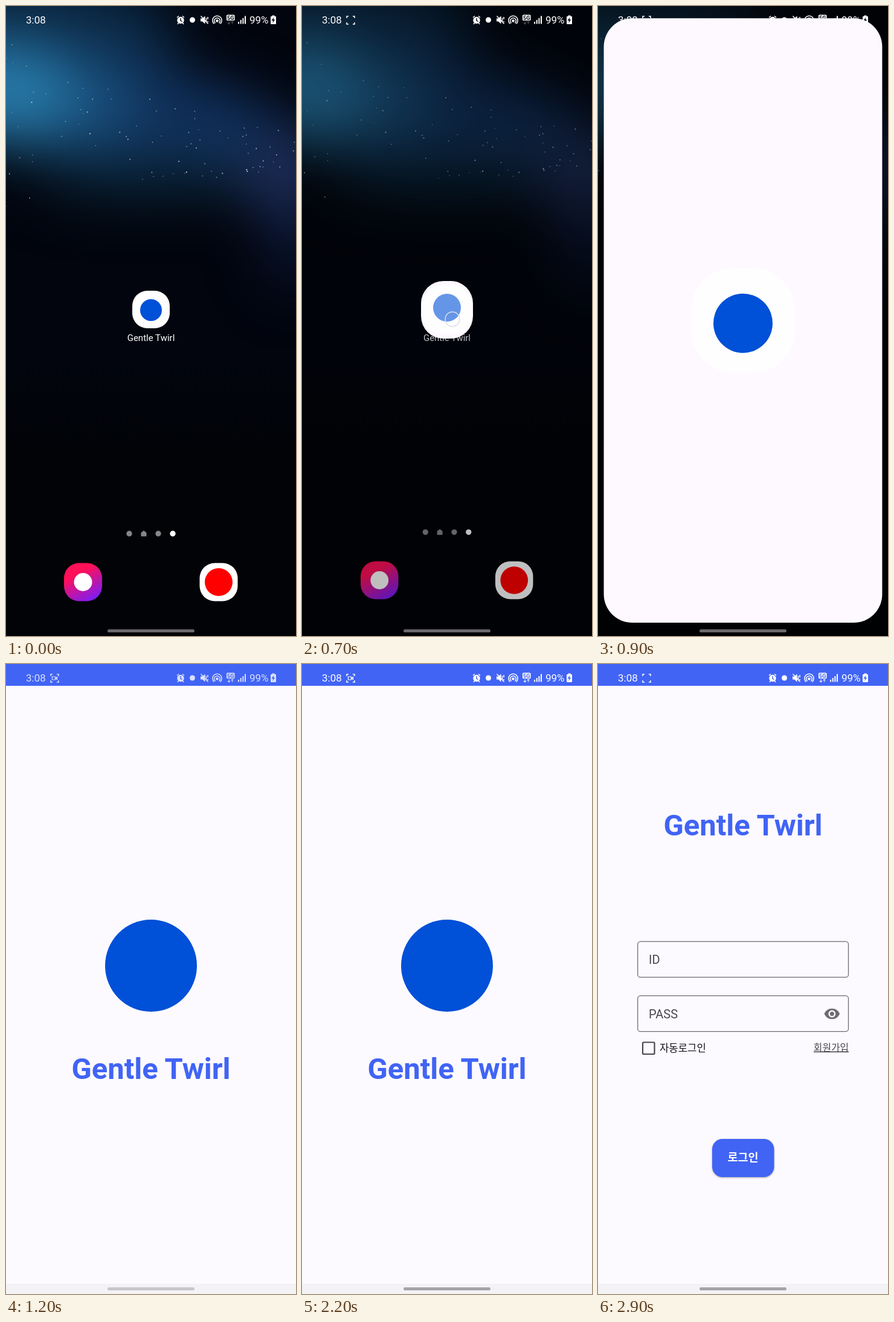
An HTML page for the animation above (3200 ms loop, 480x1040 px).

```html
<!DOCTYPE html>
<html lang="ko">
<head>
<meta charset="utf-8">
<title>App launch</title>
<style>
  html, body { margin: 0; width: 100%; height: 100%; overflow: hidden; background: #02040a; }
  svg { display: block; width: 100%; height: 100%; --bg: #02060e; }
  text { font-family: Roboto, "Noto Sans CJK KR", "Noto Sans CJK", sans-serif; }
  .title { font-size: 49px; font-weight: 700; fill: #4164f5; text-anchor: middle; }
  .hint { font-size: 20px; fill: #49454f; }
  .box { fill: none; stroke: #6f6b73; stroke-width: 1.3; }
  .line { fill: none; stroke: #fff; stroke-width: 1.5; }
  .cut { fill: none; stroke: var(--bg); stroke-width: 1.4; }
  .glow { filter: blur(45px); }
  #page { --bg: #4164f5; }
</style>
</head>
<body>
<svg viewBox="0 0 480 1040">
  <defs>
    <linearGradient id="tile" x1=".25" y1="0" x2=".8" y2="1">
      <stop offset=".25" stop-color="#ff1058"/>
      <stop offset="1" stop-color="#761dff"/>
    </linearGradient>
    <linearGradient id="night" x2="0" y2="1">
      <stop offset=".56" stop-color="#02050e"/>
      <stop offset=".7" stop-color="#010307"/>
    </linearGradient>
  </defs>

  <rect width="480" height="1040" fill="url(#night)"/>
  <g id="wall">
    <g class="glow">
      <ellipse cx="60" cy="50" rx="220" ry="100" fill="#0c2b48"/>
      <ellipse cx="210" cy="180" rx="310" ry="95" fill="#10305a" transform="rotate(14 210 180)"/>
      <ellipse cx="230" cy="290" rx="190" ry="30" fill="#08202e"/>
      <ellipse cx="475" cy="370" rx="50" ry="100" fill="#0a1430"/>
      <ellipse cx="470" cy="275" rx="90" ry="72" fill="#1b2b54"/>
      <ellipse cx="80" cy="160" rx="140" ry="85" fill="#174c78"/>
      <ellipse cx="-5" cy="140" rx="120" ry="85" fill="#2677a6"/>
    </g>
    <g id="stars" fill="#d8e4e4"></g>
  </g>
  <rect id="shade" width="480" height="1040"/>

  <g id="home">
    <rect x="209" y="470" width="62" height="62" rx="25" fill="#fff"/>
    <circle cx="240" cy="502" r="18" fill="#0050d8"/>
    <text x="240" y="553" font-size="15" fill="#fff" text-anchor="middle">Gentle Twirl</text>
    <g fill="#868686">
      <circle cx="204" cy="871" r="4.7"/>
      <path d="M223.5 875.500v-6l4.500-3.500 4.500 3.500v6z"/>
      <circle cx="252" cy="871" r="4.7"/>
      <circle cx="276" cy="871" r="4.7" fill="#fff"/>
    </g>
    <rect x="96" y="919.5" width="63" height="63" rx="25" fill="url(#tile)"/>
    <circle cx="127.5" cy="951" r="15" fill="#fff"/>
    <rect x="320.5" y="919.5" width="63" height="63" rx="25" fill="#fff"/>
    <circle cx="352" cy="951" r="23" fill="#f00"/>
  </g>

  <g id="status" fill="#fff">
    <text x="33" y="29" font-size="17">3:08</text>
    <g id="record">
      <path class="line" d="M74 20v-3h3M84 17h3v3M87 27v3h-3M77 30h-3v-3"/>
      <path id="camera" class="line" style="stroke-width:1.2" d="M76.500 21h5v5h-5zM82 23.500l2.500-2v4z"/>
    </g>
    <circle cx="289" cy="23.5" r="5.7"/>
    <path class="line" d="M283 19l3-2.500M295 19l-3-2.500M285.500 28l-1.500 2M292.500 28l1.500 2"/>
    <path class="cut" d="M289 20v4l2.500 1.500"/>
    <circle cx="308.5" cy="23" r="4.5"/>
    <path d="M322 20.500h3l4.500-4v13l-4.500-4h-3z"/>
    <path class="line" d="M322.500 16.500l12 13M331.500 19.500v7M334 18v4M334 25v2"/>
    <circle cx="349.5" cy="24.5" r="2.2"/>
    <path class="line" d="M346.500 28.300a4.800 4.800 0 1 1 6 0M344.500 29.500a7.600 7.600 0 1 1 10 0"/>
    <rect x="365" y="14.5" width="13.5" height="9.5" rx="1.5"/>
    <text x="371.7" y="22.5" font-size="9" font-weight="700" text-anchor="middle" style="fill:var(--bg)">5G</text>
    <path id="arrows" class="line" style="stroke-width:1.1" d="M369 25v5m-2-2l2 2 2-2M374.500 30v-5m-2 2l2-2 2 2"/>
    <path d="M384 26h2v3.500h-2zM387.700 23h2v6.500h-2zM391.400 20h2v9.500h-2zM395 16.500h2v13h-2z"/>
    <text x="403" y="29" font-size="17">99%</text>
    <path d="M440.500 15.500h4v1.500h1.500a1 1 0 0 1 1 1v11a1 1 0 0 1-1 1h-7a1 1 0 0 1-1-1v-11a1 1 0 0 1 1-1h1.500z"/>
    <path d="M443.500 18.500l-4 5.500h2.500l-.7 4 4-5.500h-2.500z" style="fill:var(--bg)"/>
  </g>

  <g id="splash">
    <rect id="pane" fill="#fdf9fe"/>
    <rect id="plate" fill="#fefefe"/>
    <circle id="mark" cx="240" fill="#0050d8"/>
    <circle id="tap" cx="249" cy="517" r="12" fill="none" stroke="#dedee6" stroke-width="1.5"/>
  </g>

  <g id="page">
    <rect width="480" height="1040" fill="#fdfaff"/>
    <rect y="1023" width="480" height="17" fill="#f3f2f5"/>
    <g id="intro">
      <circle cx="240" cy="498" r="76" fill="#0050d8"/>
      <text class="title" x="240" y="685">Gentle Twirl</text>
    </g>
    <g id="login">
      <text class="title" x="240" y="283">Gentle Twirl</text>
      <rect class="box" x="65.7" y="458.2" width="348.8" height="59" rx="4.5"/>
      <text class="hint" x="84" y="494.5">ID</text>
      <rect class="box" x="65.7" y="547.7" width="348.8" height="59" rx="4.5"/>
      <text class="hint" x="84" y="584.5">PASS</text>
      <path d="M374.500 577.500q3.600-8.700 12.800-8.700t12.800 8.700q-3.600 8.700-12.800 8.700t-12.800-8.700z" fill="#6f6b70"/>
      <circle cx="387.3" cy="577.5" r="4.7" fill="#6f6b70" stroke="#fdfaff" stroke-width="2.4"/>
      <rect x="74" y="624.5" width="19.5" height="19.5" rx="1.5" fill="none" stroke="#49454f" stroke-width="2.2"/>
      <text x="102" y="639.5" font-size="16.7" fill="#15131a">자동로그인</text>
      <text x="415" y="638.5" font-size="15.8" fill="#49454f" text-anchor="end" text-decoration="underline">회원가입</text>
      <rect x="189" y="784" width="102.5" height="63" rx="17" fill="#4164f5" style="filter:drop-shadow(0 1.5px 1.5px #0005)"/>
      <text x="240" y="821" font-size="18.5" font-weight="700" fill="#fff" text-anchor="middle">로그인</text>
    </g>
    <rect width="480" height="36" fill="#4164f5"/>
    <use id="bar" href="#status"/>
  </g>
  <rect id="pill" x="168" y="1029" width="144" height="5" rx="2.5"/>
</svg>
<script>
const $ = id => document.getElementById(id);
const setAll = (el, attrs) => {
  for (const name in attrs) el.setAttribute(name, attrs[name]);
};
const set = (id, attrs) => setAll($(id), attrs);
const show = (id, opacity) => set(id, { opacity: +opacity });

const mix = (a, b, p) => a + (b - a) * p;
const ramp = (t, from, to) => Math.min(1, Math.max(0, (t - from) / (to - from)));
const easeOut = (p, power) => 1 - (1 - p) ** power;
const zoom = k => `translate(240 520) scale(${k}) translate(-240 -520)`;
const centred = (cx, cy, w, h, rx) =>
  ({ x: cx - w / 2, y: cy - h / 2, width: w, height: h, rx });

// Stars: dense and widely spread on the left, a thin band on the right
let seed = 7;
const random = () => (seed = seed * 16807 % 2147483647) / 2147483647;
for (let i = 0; i < 85; i++) {
  const side = random() ** 1.5;
  const spread = mix(155, 35, Math.sqrt(side));
  const star = document.createElementNS("http://www.w3.org/2000/svg", "circle");
  setAll(star, {
    cx: 480 * side,
    cy: mix(200, 245, side) + spread * (2 * random() - 1),
    r: mix(.6, 1.05, random()),
    opacity: mix(.5, .95, random())
  });
  $("stars").append(star);
}

function draw(t) {
  // Home screen recedes
  const leave = ramp(t, 600, 1000);
  set("wall", { transform: zoom(1 + .028 * leave) });
  set("home", { transform: zoom(1 - .028 * leave) });
  show("home", 1 - leave);
  show("shade", .58 * easeOut(ramp(t, 600, 900), 2));

  // Recording badge blinks once a second
  show("record", t >= 100);
  show("camera", t % 1000 >= 200 && t % 1000 < 700);
  show("arrows", t < 1100 ? .3 : .85);

  // Window grows out of the icon, slightly past the screen's height
  const open = easeOut(ramp(t, 700, 1000), 2.75);
  const width = mix(86, 480, open);
  const cy = mix(501.5, 520, open);
  const plate = mix(80, 177, open);
  show("splash", t >= 700);
  set("pane", centred(240, cy, width, mix(95, 1044, open), open < 1 ? Math.min(47, width * .43) : 0));
  set("plate", centred(240.5, cy, plate, plate, plate * .4));
  set("mark", { cy: mix(498, 525, open), r: mix(23, 50.3, open), opacity: Math.min(1, .6 + open) });
  show("tap", open === 0);

  // App pages cross-fade
  const login = ramp(t, 2300, 2500);
  show("page", ramp(t, 1000, 1200));
  show("bar", mix(.6, 1, ramp(t, 1000, 1400)));
  show("intro", 1 - login);
  show("login", login);

  const grey = t < 1000 ? 106 : mix(200, 166, ramp(t, 1200, 1400));
  set("pill", { fill: `rgb(${grey},${grey - 2},${grey})` });
}

const LOOP = 3200, STEP = 100;
const start = performance.now();
function tick() {
  const t = (performance.now() - start) % LOOP;
  draw(Math.floor(t / STEP) * STEP);
  requestAnimationFrame(tick);
}
tick();
</script>
</body>
</html>
```
